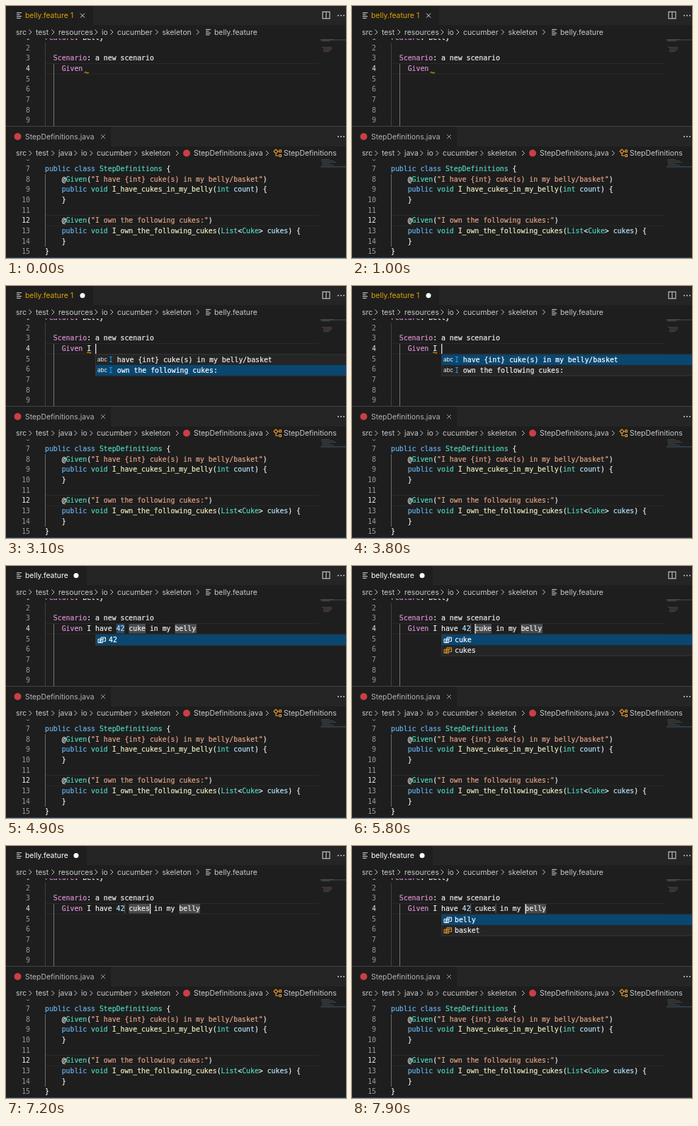
An HTML page for the animation above (8 s loop, 480x357 px).

```html
<!DOCTYPE html>
<html lang="en">
<head>
<meta charset="utf-8">
<title>Step completion</title>
<style>
html, body { margin: 0; width: 100%; height: 100%; overflow: hidden; background: #1e1e1e; }
svg { display: block; width: 480px; height: 357px; }
text { white-space: pre; }
.code { font: 9.83px "DejaVu Sans Mono", monospace; stroke-width: .2px; }
.ui { font: 10.4px Inter, sans-serif; }
</style>
</head>
<body>
<svg id="stage" viewBox="0 0 480 357"></svg>
<script>
const LOOP = 8000, CHAR = 5.92, LINE = 14.67, LEFT = 55;
const C = {
  bg: '#1e1e1e', bar: '#252526', text: '#f0f0f0', crumb: '#cacaca', icon: '#dcdcdc', pink: '#dc92d6',
  blue: '#66b2ee', teal: '#4fd8bd', string: '#e4a386', method: '#ececc0', param: '#b4e4fc',
  warn: '#dba400', red: '#cc3e44', orange: '#ee9d28', pick: '#094771', match: '#18a3ff', white: '#ffffff'
};
const el = (tag, attrs, body = '') =>
  `<${tag} ${Object.entries(attrs).map(([k, v]) => `${k}="${v}"`).join(' ')}>${body}</${tag}>`;
const esc = s => s.replace(/&/g, '&amp;').replace(/</g, '&lt;');
const rect = (x, y, width, height, fill, more = {}) => el('rect', { x, y, width, height, fill, ...more });
const path = (d, stroke, width = 1) => el('path', { d, stroke, 'stroke-width': width, fill: 'none' });
const dot = (cx, cy, r, fill) => el('circle', { cx, cy, r, fill });
const ui = (x, y, s, fill) => el('text', { class: 'ui', x, y, fill }, esc(s));
const col = n => LEFT + n * CHAR;

// Coloured runs are [colour, text] pairs.
const code = (x, y, ...runs) => el('text', { class: 'code', x, y },
  runs.map(([fill, s]) => el('tspan', { fill, stroke: fill }, esc(s))).join(''));

const listIcon = (x, y, color) => path([0, 2.5, 5, 7.5].map((dy, i) =>
  `M${x} ${y + dy}h${i === 1 ? 4.5 : i === 3 ? 5.5 : 7}`).join(''), color);
const dots = y => [469, 473, 477].map(x => dot(x, y, 0.9, C.icon)).join('');
const cross = (x, y, color) => path(`M${x - 3} ${y - 3}l6 6m0 -6l-6 6`, color);

function crumbs(y, names, starts) {
  return names.map((name, i) => {
    const hasIcon = /[S.]/.test(name);
    const chevron = i ? path(`M${starts[i] - (hasIcon ? 25 : 9.5)} ${y - 3.5}l3.5 3.5l-3.5 3.5`, C.crumb) : '';
    return chevron + ui(starts[i], y + 3.7, name, C.crumb);
  }).join('');
}

function lineNumbers(from, to, y, active) {
  let out = '';
  for (let n = from; n <= to; n++) {
    out += el('text', {
      class: 'code', x: 34, y: y + (n - from) * LINE, 'text-anchor': 'end',
      fill: n === active ? '#e8e8e8' : '#999'
    }, n);
  }
  return out;
}

const currentLine = y => path(`M${LEFT} ${y}H442M${LEFT} ${y + LINE}H442`, '#2a2a2a');

function topPane() {
  return lineNumbers(1, 9, 48.1, 4) +
    code(LEFT, 48.1, [C.pink, 'Feature'], [C.text, ': Belly']) +
    currentLine(81.5) +
    path('M55.5 52V170', '#404040') + path('M67.5 82V170', '#747474') +
    code(col(2), 77.4, [C.pink, 'Scenario'], [C.text, ': a new scenario']) +
    rect(443, 47, 37, 2, '#3b4650', { opacity: .6 }) + path('M445 47.5h18M445 49.5h13', '#555', .8) +
    path('M446 58.5h14M448 60.5h12M448 62.5h11M448 64.5h8', '#66524e', .8);
}

function topChrome() {
  return rect(0, 0, 480, 46, C.bg) + rect(123, 0, 357, 27, C.bar) +
    crumbs(37, ['src', 'test', 'resources', 'io', 'cucumber', 'skeleton', 'belly.feature'],
      [14, 42, 74, 135, 157, 220.5, 294]) +
    listIcon(282, 33.3, C.icon) +
    el('rect', { x: 447, y: 8.2, width: 10, height: 9.6, fill: 'none', stroke: C.icon }) +
    path('M452 8.5v9', C.icon) + dots(13.5);
}

function bottomPane() {
  const y = n => 234 + (n - 7) * LINE;
  const given = s => [[C.text, '@'], [C.teal, 'Given'], [C.text, '('], [C.string, s], [C.text, ')']];
  const method = (name, ...args) => [[C.blue, 'public '], [C.teal, 'void '], [C.method, name], [C.text, '('], ...args, [C.text, ') {']];
  return rect(0, 170, 480, 187, C.bg) +
    lineNumbers(6, 15, y(6), 12) + currentLine(296.5) + path('M55.5 238V341', '#6a6a6a') +
    code(LEFT, y(7), [C.blue, 'public class '], [C.teal, 'StepDefinitions'], [C.text, ' {']) +
    code(col(4), y(8), ...given('"I have {int} cuke(s) in my belly/basket"')) +
    code(col(4), y(9), ...method('I_have_cukes_in_my_belly', [C.teal, 'int '], [C.param, 'count'])) +
    code(col(4), y(10), [C.text, '}']) +
    code(col(4), y(12), ...given('"I own the following cukes:"')) +
    code(col(4), y(13), ...method('I_own_the_following_cukes', [C.teal, 'List'], [C.text, '<'], [C.teal, 'Cuke'], [C.text, '> '], [C.param, 'cukes'])) +
    code(col(4), y(14), [C.text, '}']) + code(LEFT, y(15), [C.text, '}']) +
    rect(0, 356, 480, 1, '#1c4268') +
    rect(0, 170, 480, 47.5, C.bg) + rect(148, 171, 332, 28, C.bar) +
    path('M0 170.5H480', '#444') +
    dot(16.5, 185, 5, C.red) + ui(27, 188.7, 'StepDefinitions.java', '#b4b4b4') +
    cross(137, 185, '#9a9a9a') + dots(185) +
    crumbs(208.5, ['src', 'test', 'java', 'io', 'cucumber', 'skeleton', 'StepDefinitions.java', 'StepDefinitions'],
      [14, 42, 74, 106, 128, 191, 265, 392]) +
    dot(255, 208.5, 5, C.red) +
    path('M378 206l3 -3l3 3l-3 3zM383 206h3M381 209v3h4M386 204h2.5v3h-2.5zM386 210.5h2.5v3h-2.5z', C.orange, 1.1) +
    path('M445 217.5h12M445 219.5h18M446 221.5h20M446 223.5h11M446 225.5h17', '#4b5357', .8) +
    rect(444, 227, 36, 1.5, '#304653');
}

const sentences = ['have {int} cuke(s) in my belly/basket', 'own the following cukes:'];
const EDGE = '#66696c';

// Each step lists only what changes; moved marks a restart of the caret blink.
// Marks are [column, length, fill]; an EDGE mark is a thin line at its end.
const steps = [
  { at: 0, text: '', caret: 6, moved: -500, warn: true, dirty: false, squiggle: 111, marks: [], popup: null },
  { at: 1500, text: 'I', caret: 7, moved: 1500, dirty: true, squiggle: 114.5 },
  { at: 1800, text: 'I ', caret: 8, moved: 1800 },
  { at: 2300, popup: { sentences, pick: 0 } },
  { at: 2900, popup: { sentences, pick: 1 } },
  { at: 3500, popup: { sentences, pick: 0 } },
  { at: 4300, text: 'I have 42 cuke in my belly', caret: 13, moved: 4300, squiggle: null,
    marks: [[13, 2, '#2b4866'], [16, 4], [27, 5], [27, 5, EDGE]], popup: { choices: ['42'], pick: 0 } },
  { at: 4600, warn: false },
  { at: 5450, caret: 16, moved: 5450, marks: [[13, 2, EDGE], [16, 4], [27, 5], [27, 5, EDGE]],
    popup: { choices: ['cuke', 'cukes'], pick: 0 } },
  { at: 6200, popup: { choices: ['cuke', 'cukes'], pick: 1 } },
  { at: 6900, text: 'I have 42 cukes in my belly', caret: 21, moved: 6900,
    marks: [[13, 2, EDGE], [16, 5], [28, 5]], popup: null },
  { at: 7500, caret: 28, moved: 7500, marks: [[13, 2, EDGE], [16, 5, EDGE], [28, 5]],
    popup: { choices: ['belly', 'basket'], pick: 0 } }
];

const stateAt = t => Object.assign({}, ...steps.filter(s => s.at <= t));

function choiceIcon(x, y, color) {
  return path(`M${x + 4} ${y + 2}v-5.5h6.5v5.5h-3M${x} ${y - 1}h6.5v5h-6.5zM${x + 1.5} ${y + 1}h3.5M${x + 1.5} ${y + 2.7}h3.5M${x + 6} ${y - 1.5}h3`, color);
}

function popup({ sentences, choices, pick }) {
  const rows = sentences || choices;
  return rect(126.5, 97, 360, rows.length * LINE + .8, C.bar, { stroke: '#353536' }) +
    rows.map((label, i) => {
      const top = 97.3 + i * LINE, mid = top + LINE / 2, base = mid + 3.3, on = i === pick;
      const back = on ? rect(127, top, 353, LINE, C.pick) : '';
      const fill = on ? C.white : C.text;
      if (choices) return back + choiceIcon(130, mid, on ? C.white : C.orange) + code(145, base, [fill, label]);
      return back + el('text', { x: 129, y: mid + 2.8, fill, style: 'font:8px Inter,sans-serif' }, 'abc') +
        el('text', { class: 'code', x: 145, y: base, fill: C.match, 'font-weight': 'bold' }, 'I') +
        code(145 + 2 * CHAR, base, [fill, label]);
    }).join('');
}

function givenLine(s, t) {
  const at = n => col(4 + n);
  const marks = s.marks.map(([start, length, fill = '#484a4c']) => fill === EDGE
    ? path(`M${at(start + length)} 82.5v12.5`, EDGE)
    : rect(at(start), 82, length * CHAR, 13.5, fill)).join('');
  const [before, after] = s.text.split('42');
  const runs = after === undefined ? [[C.text, before]] : [[C.text, before], [C.param, '42'], [C.text, after]];
  const wave = s.squiggle ? path(`M${s.squiggle} 95q1.4 -2.6 2.8 -.6t2.8 -.6`, C.warn, 1.1) : '';
  const caretOn = (t - s.moved) % 1000 < 500;
  return marks + code(at(0), 92.1, [C.pink, 'Given '], ...runs) + wave +
    (caretOn ? rect(at(s.caret), 82, 1.3, 14, '#e0e0e0') : '');
}

function tab(s) {
  const color = s.warn ? C.warn : C.white;
  return listIcon(15, 9.7, C.icon) + ui(27, 17.2, 'belly.feature', color) +
    (s.warn ? ui(91, 17.2, '1', color) : rect(114, 0, 9, 27, C.bar)) +
    (s.dirty ? dot(s.warn ? 108 : 99, 13.5, 3.5, C.white) : cross(108, 13.5, C.icon));
}

const stage = document.getElementById('stage');
stage.innerHTML = rect(0, 0, 480, 357, C.bg) + topPane() + '<g id="line"></g>' +
  topChrome() + '<g id="tab"></g>' + bottomPane() + '<g id="popup"></g>';
const layers = ['line', 'tab', 'popup'].map(id => document.getElementById(id));

function render(t) {
  const s = stateAt(t);
  [givenLine(s, t), tab(s), s.popup ? popup(s.popup) : ''].forEach((markup, i) => {
    if (layers[i].markup !== markup) layers[i].innerHTML = layers[i].markup = markup;
  });
}

const start = performance.now();
function frame() {
  render((performance.now() - start) % LOOP);
  requestAnimationFrame(frame);
}
frame();
</script>
</body>
</html>
```
